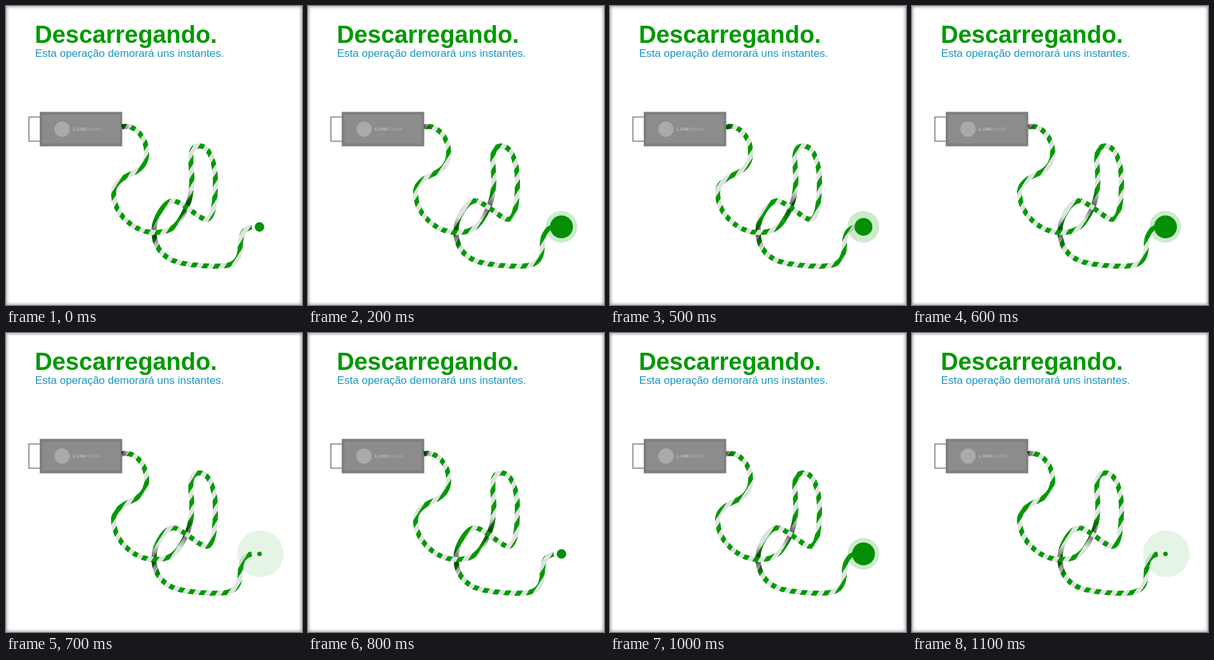
An HTML page that plays this animation: 465x470 px, repeating every 1200 ms.

```html
<!DOCTYPE html>
<html lang="pt">
<head>
<meta charset="utf-8">
<title>Descarregando</title>
<style>
  html, body { margin: 0; width: 100%; height: 100%; overflow: hidden; background: #fff; }
  svg { display: block; width: 465px; height: 470px; }
  .edge { position: absolute; left: 0; top: 0; width: 465px; height: 470px; box-shadow: inset 0 0 5px 1px #999; }
  text { font-family: Arial, "Liberation Sans", sans-serif; }
  .cord { fill: none; stroke-width: 8; }
</style>
</head>
<body>
<svg viewBox="0 0 465 470">
  <defs>
    <!-- Slanted stripes, repeating every 18 px across and 28 px down -->
    <linearGradient id="stripes" gradientUnits="userSpaceOnUse" spreadMethod="repeat"
      x1="0" y1="0" x2="12.77" y2="8.17">
      <stop offset=".5" stop-color="#009a00"/>
      <stop offset=".5" stop-color="#dfe2df"/>
    </linearGradient>
  </defs>

  <text x="45.2" y="58.4" font-size="37.9" font-weight="bold" fill="#009900">Descarregando.</text>
  <text x="45.7" y="80" font-size="17" fill="#1795c4">Esta operação demorará uns instantes.</text>

  <rect x="36" y="174.5" width="20" height="38" fill="#fff" stroke="#7f7f7f" stroke-width="1.6"/>
  <rect x="53" y="166.4" width="129.6" height="54.2" fill="#7f7f7f"/>
  <rect x="57.3" y="171" width="121.4" height="45" fill="#8c8c8c"/>
  <circle cx="88" cy="193.5" r="12" fill="#aaa"/>
  <text x="105" y="195.6" font-size="7.5" font-weight="bold" letter-spacing=".9" fill="#c0c0c0">LUMI<tspan font-weight="normal" fill="#b4b4b4">VASK</tspan></text>

  <g id="rope"></g>
  <circle id="halo" fill="#009900"/>
  <circle id="dot" fill="#058f05"/>
</svg>
<div class="edge"></div>
<script>
  const SVG = "http://www.w3.org/2000/svg";
  const byId = id => document.getElementById(id);

  function set(el, attrs) {
    for (const key in attrs) el.setAttribute(key, attrs[key]);
    return el;
  }

  function add(parent, tag, attrs) {
    return parent.appendChild(set(document.createElementNS(SVG, tag), attrs));
  }

  // Strands from back to front; shade = [x, y, radius, opacity]
  const strands = [
    { d: "M272 338C287 315 292 298 292 270C291 248 285 221 303 220C321 219 329 250 329 275C329 302 327 336 314 335.5",
      shade: [284, 314, 26, 0.62] },
    { d: "M314 335.5C302 334 284 312 264 306" },
    { d: "M264 306C248 306 233 335 232.5 352C232 375 242 391 262 400C285 409 330 410 346 408C364 405 368 392 368 377C369 360 372 350 386 347.5",
      shade: [232, 357, 26, 0.65] },
    { d: "M182 190C203 185 221 207 221 231C221 246 214 256 199 263C182 270 169 279 169 293C169 328 202 356 234 356C252 356 263 351 272 338",
      shade: [182, 190, 13, 0.7] }
  ];

  strands.forEach(({ d, shade }, i) => {
    add(byId("rope"), "path", { d, class: "cord", stroke: "url(#stripes)" });
    if (!shade) return;
    const [cx, cy, r, opacity] = shade;
    const gradient = add(document.querySelector("defs"), "radialGradient",
      { id: "shade" + i, gradientUnits: "userSpaceOnUse", cx, cy, r });
    add(gradient, "stop", { offset: 0, "stop-opacity": opacity });
    add(gradient, "stop", { offset: 1, "stop-opacity": 0 });
    add(byId("rope"), "path", { d, class: "cord", stroke: `url(#shade${i})` });
  });

  const STEP = 100, STEPS = 12, PERIOD = 18;
  const pulse = [
    { dot: 7.5, halo: 0, alpha: 0 },
    { dot: 14, halo: 25, alpha: 0.2 },
    { dot: 18, halo: 25, alpha: 0.2 },
    { dot: 3.5, halo: 36.7, alpha: 0.1 }
  ];

  function draw(time) {
    const step = Math.floor(time / STEP) % STEPS;
    const phase = step % pulse.length;
    const { dot, halo, alpha } = pulse[phase];
    const shift = 12 + PERIOD * phase / pulse.length;
    set(byId("stripes"), { gradientTransform: `translate(${shift} 0)` });
    set(byId("dot"), { cx: 398.2, cy: 347.2, r: dot });
    // The first pulse has no wide ring
    set(byId("halo"), {
      cx: halo > 30 ? 399.5 : 398, cy: 347,
      r: step === 3 ? 0 : halo, "fill-opacity": alpha
    });
  }

  const start = performance.now();
  function tick() {
    draw(performance.now() - start);
    requestAnimationFrame(tick);
  }
  tick();
</script>
</body>
</html>
```
